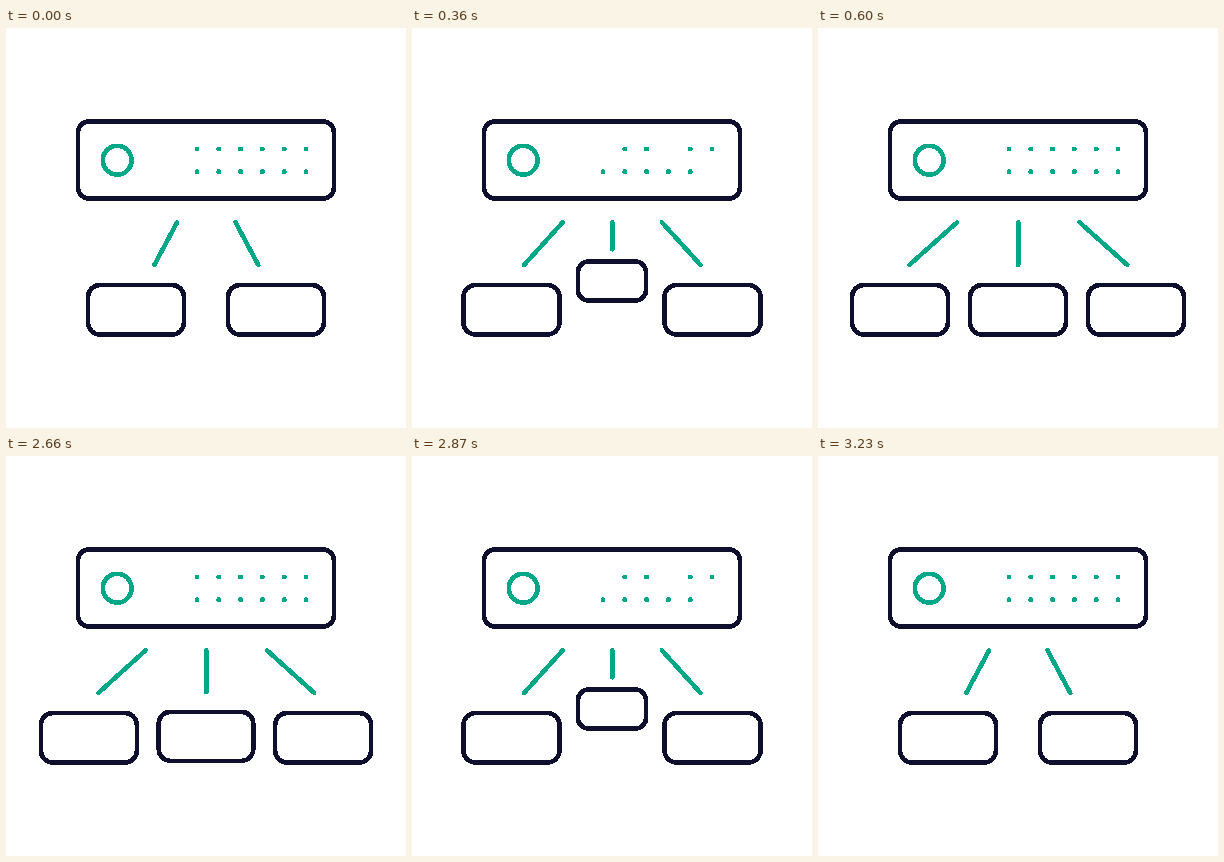
An HTML page for the animation above (4.26 s loop, 400 by 400 pixels).

```html
<!DOCTYPE html>
<html lang="en">
<head>
<meta charset="utf-8">
<title>Server branches</title>
<style>
  html, body { margin: 0; width: 100%; height: 100%; overflow: hidden; background: #fff; }
  svg { display: block; width: 100%; height: 100%; }
  .dark { stroke: #0e0f2c; }
  .green { stroke: #00a887; }
</style>
</head>
<body>
<svg viewBox="0 0 400 400" fill="none" stroke-width="4.6" stroke-linecap="round" shape-rendering="crispEdges">
  <rect class="dark" x="72" y="93.5" width="256" height="77" rx="11"/>
  <circle class="green" cx="111.2" cy="132.2" r="14.4"/>
  <g id="dots" fill="#00a887"></g>
  <path id="links" class="green"/>
  <rect id="left" class="dark" y="257" width="96" height="49.5" rx="12"/>
  <rect id="right" class="dark" y="257" width="96" height="49.5" rx="12"/>
  <g id="middle">
    <path id="stem" class="green"/>
    <rect id="box" class="dark"/>
  </g>
</svg>
<script>
const LOOP = 4260, STEP = 30, STEPS = 20, CLOSE_AT = 2660;
const CENTER = 200, LINK_CENTER = 200.3;
const BOX_WIDTH = 96, BOX_HEIGHT = 49.5;
const LINK_TOP = 194.3, LINK_BOTTOM = 237;
const $ = id => document.getElementById(id);
const mix = (a, b, p) => a + (b - a) * p;
const set = (el, attrs) => { for (const k in attrs) el.setAttribute(k, attrs[k]); };

// Dots that blink off: index -> [first hidden step, first visible step]
const blinks = { 0: [1, 15], 3: [10, 17], 11: [4, 15] };
const dots = Array.from({ length: 12 }, (_, i) => {
  const dot = document.createElementNS("http://www.w3.org/2000/svg", "circle");
  set(dot, { cx: 191 + 21.8 * (i % 6), cy: i < 6 ? 121 : 143.7, r: 2.5 });
  return $("dots").appendChild(dot);
});

function stepAt(t) {
  return t < CLOSE_AT
    ? Math.min(STEPS, Math.floor(t / STEP))
    : Math.max(0, STEPS - 1 - Math.floor((t - CLOSE_AT) / STEP));
}

function ease(u) {
  return mix(u, u * u * (3 - 2 * u), 0.75);
}

function draw(step) {
  const p = ease(step / STEPS);

  const x = mix(82, 34, p);
  set($("left"), { x });
  set($("right"), { x: 2 * CENTER - x - BOX_WIDTH });

  const top = mix(29.2, 61.2, p), bottom = mix(52, 109, p);
  set($("links"), {
    d: [-1, 1].map(side =>
      `M${LINK_CENTER + side * top} ${LINK_TOP}L${LINK_CENTER + side * bottom} ${LINK_BOTTOM}`
    ).join("")
  });

  const width = mix(20, BOX_WIDTH, p), height = mix(21, BOX_HEIGHT, p);
  set($("box"), {
    x: CENTER - width / 2, y: mix(203, 281.75, p) - height / 2,
    width, height, rx: mix(9.5, 12, p)
  });
  set($("stem"), { d: `M${LINK_CENTER} ${LINK_TOP}V${mix(LINK_TOP, LINK_BOTTOM, p)}` });
  set($("middle"), { visibility: step ? "visible" : "hidden" });

  dots.forEach((dot, i) => {
    const [off, on] = blinks[i] || [0, 0];
    set(dot, { visibility: step >= off && step < on ? "hidden" : "visible" });
  });
}

const start = performance.now();
function tick() {
  draw(stepAt((performance.now() - start) % LOOP));
  requestAnimationFrame(tick);
}
tick();
</script>
</body>
</html>
```
